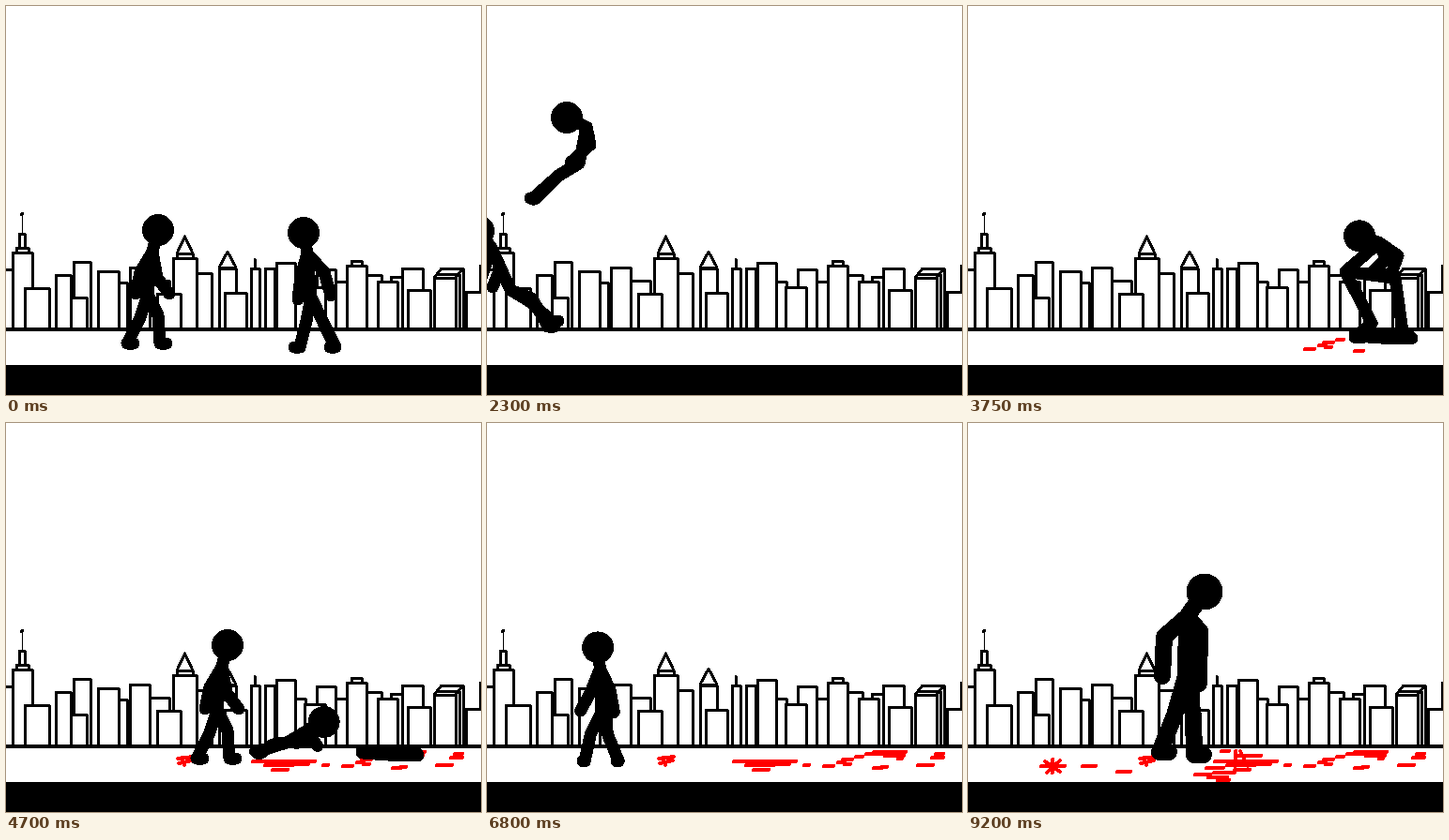
An HTML page that plays this animation: 506x415 px, repeating every 9.35 s.

```html
<!DOCTYPE html>
<html lang="en">
<head>
<meta charset="utf-8">
<title>City stick fight</title>
<style>
html, body { margin: 0; width: 100%; height: 100%; overflow: hidden; background: #fff; }
svg { display: block; width: 506px; height: 415px; shape-rendering: crispEdges; }
path { stroke-linecap: round; stroke-linejoin: round; }
</style>
</head>
<body>
<svg id="stage" viewBox="0 0 506 415">
  <g id="city" fill="#fff" stroke="#000" stroke-width="3"></g>
  <path d="M0 344.5H506" stroke="#000" stroke-width="4"/>
  <path d="M0 383H506V415H0Z"/>
  <g id="blood" fill="none" stroke="#f00" stroke-width="4"></g>
  <path id="corpse" d="M380 351L407 353L438 354" fill="none" stroke="#000" stroke-width="15"/>
  <g id="cast" stroke="#000" fill="none"></g>
  <g id="car">
    <path d="M-100 300L-70 288L0 283L78 275L95 290L160 291L222 286L229 256L262 268L305 265L365 275L371 292L383 297V309L372 318L350 325L338 345H288L282 331Q240 342 188 337L184 342L92 346L30 353H-90Z"/>
    <path d="M82 277L118 245L205 238L276 266M156 243L160 286" fill="none" stroke="#000" stroke-width="9"/>
    <path d="M155 243L160 286" stroke="#000" stroke-width="13"/>
    <circle cx="186" cy="269" r="17"/>
    <circle cx="61" cy="351" r="31"/>
    <circle cx="318" cy="334" r="31"/>
  </g>
</svg>
<script>
const LOOP = 9350, STEP_MS = 50;
const $ = id => document.getElementById(id);
function add(parent, tag, attrs) {
  const el = document.createElementNS('http://www.w3.org/2000/svg', tag);
  for (const k in attrs) el.setAttribute(k, attrs[k]);
  return parent.appendChild(el);
}

// Skyline: left, top, right; later buildings stand in front.
const buildings = `-9 281 8,14 243 20,11 258 24,7 263 28,20 301 46,53 287 69,72 273 90,69 311 86,
120 295 129,98 283 120,153 293 174,132 279 153,182 264 199,178 269 203,161 307 186,203 285 219,
227 280 245,233 306 256,261 280 270,276 280 286,288 274 308,308 294 319,331 281 351,318 300 340,
351 294 368,368 272 379,363 277 384,384 287 400,410 289 428,396 294 417,422 280 444,428 303 452`;
for (const item of buildings.split(',')) {
  const [l, t, r] = item.trim().split(' ').map(Number);
  add($('city'), 'path', { d: `M${l} 343V${t}H${r}V343` });
}
add($('city'), 'path', { d: 'M182 264L190.500 246L199 264ZM227 279L236 262L245 279ZM265 280V270' });
add($('city'), 'path', { d: 'M456 343V290L464 280H487V343M456 290H479V343M479 290L487 280M460 286H482M479 290V343M483 286V343' });
add($('city'), 'path', { d: 'M505 305V277H512M490 343V305H512V343' });
add($('city'), 'path', { d: 'M17 243V222', 'stroke-width': 1 });
add($('city'), 'circle', { cx: 17, cy: 222, r: 1, 'stroke-width': 2 });

const stains = [
  [3000, 'M359 366h10M374 362h7M379 359h10M381 364h6M393 356h7M412 368h9'],
  [4100, 'M404 353h20M412 351h34M424 355h20M438 358h4M420 367h6M459 365h16M474 357h12M478 353h8'],
  [4600, 'M263 361h66M276 365h30M284 370h16M310 364h12M338 365h5M183 358l16-2M184 363l14-3M187 357l3 8'],
  [8250, 'M242 375h16M256 378h20M266 381h12M254 368h18M262 373h22M270 350h8M285 350v16M290 350l8 16M288 355h24'],
  [8950, 'M78 366h25M82 361l16 11M98 360l-14 13M90 359v14M122 366h14M159 372h14']
].map(([from, d]) => ({ from, el: add($('blood'), 'path', { d }) }));

// Joints: head, neck, hip, elbow+hand twice, knee+foot twice; stored relative to the hip.
function pose(text, toe = 7) {
  const n = text.split(/[ ,]+/).map(Number);
  return [...n.map((v, i) => v - n[4 + i % 2]), toe];
}
const flip = p => p.map((v, i) => i % 2 ? v : -v);
const WALK = pose('162,239 156,262 151,308 143,284 138,307 161,290 174,307 142,335 129,360 162,330 164,360');
const STRIDE = pose('46,229 40,250 32,296 20,268 13,292 36,276 51,295 43,320 27,347 24,325 17,354');
const GUARD = pose('317,242 321,264 325,310 314,288 311,313 339,284 346,309 320,336 313,364 338,338 351,364', -6);
const BENT = pose('487,268 467,265 441,298 460,288 463,309 474,292 483,308 431,324 410,348 448,324 458,348');
const THROWN = pose('-9,240 5,258 25,303 -2,278 -8,296 14,280 6,300 48,312 65,342 45,315 69,336');
const TUCK = pose('85,117 106,127 98,166 110,146 89,165 109,140 95,165 75,180 51,204 77,178 49,203', -3);
const CROUCH = pose('417,245 438,252 402,283 458,266 450,288 445,270 430,284 430,338 412,353 455,290 464,354', 9);
const VAULT = pose('248,155 268,162 272,205 300,168 316,183 296,178 303,198 259,235 290,240 268,232 298,260', 2);
const HELD = pose('212,208 222,228 208,284 222,242 183,256 224,250 222,265 199,293 172,304 197,294 174,303', -2);
const LYING = pose('341,350 325,352 300,351 315,358 298,356 325,345 338,358 288,350 277,349 290,351 276,349', -2);
const PUNCH = pose('15,-68 8,-45 0,0 -10,-30 5,-24 30,-46 53,-48 -12,25 -28,52 18,25 20,52');
const KICK = pose('-18,-66 -8,-45 0,0 -28,-30 -20,-12 8,-28 22,-38 -4,26 -6,52 24,-6 52,-16');
const BIG_RUN = pose('160,182 148,207 153,283 109,232 110,268 190,228 217,222 130,315 92,351 160,320 157,358', 9);
const BIG_STAND = pose('252,180 233,207 232,270 209,228 207,270 247,222 246,278 220,312 204,351 240,312 241,354', 10);
const LEFT_WALK = flip(WALK), LEFT_STRIDE = flip(STRIDE);

// Alternates two poses at a steady pace.
function walk(t0, x0, t1, x1, a = WALK, b = STRIDE, y = 304) {
  const count = Math.max(1, Math.round((t1 - t0) / 150));
  return Array.from({ length: count + 1 }, (_, i) =>
    [t0 + (t1 - t0) * i / count, i % 2 ? b : a, x0 + (x1 - x0) * i / count, y]);
}

// Keys: time, pose, hip x, hip y, turn in degrees.
const cast = [
  { keys: [
    [0, WALK, 151, 308], [200, STRIDE, 185, 300], [350, WALK, 230, 305], [450, PUNCH, 262, 305],
    [550, WALK, 280, 306], [650, KICK, 300, 303], [800, WALK, 325, 306], [950, STRIDE, 368, 300],
    [1100, WALK, 410, 300], [1250, BENT, 441, 298], [1400, BENT, 440, 300],
    ...walk(1500, 425, 1950, 165, LEFT_WALK, LEFT_STRIDE),
    [2050, flip(KICK), 112, 258], [2150, flip(KICK), 90, 230], [2300, TUCK, 98, 168],
    [2450, TUCK, 190, 122, 150], [2600, TUCK, 285, 130, 290], [2750, WALK, 375, 220, 360],
    [2850, KICK, 408, 290, 360], [2950, PUNCH, 410, 304, 360], [3100, WALK, 408, 306, 360],
    [3250, KICK, 410, 303, 360], [3450, WALK, 408, 304, 360], [3650, CROUCH, 402, 284, 360],
    [3800, CROUCH, 402, 283, 360], [3950, GUARD, 400, 308, 360], [4050, flip(PUNCH), 375, 265, 360],
    [4200, TUCK, 310, 195, 260], [4350, TUCK, 235, 225, 80], [4450, WALK, 195, 300, 0],
    [4550, KICK, 225, 300], [4700, WALK, 225, 306], ...walk(4850, 225, 5150, 270),
    [5300, GUARD, 278, 308], [5550, GUARD, 278, 308], [5700, VAULT, 275, 252], [5850, VAULT, 272, 205],
    [6000, TUCK, 235, 135, -60], [6150, TUCK, 200, 108, -180], [6350, TUCK, 155, 175, -320],
    [6500, WALK, 125, 295, -360], [6650, LEFT_WALK, 122, 308, -360], [7050, flip(GUARD), 122, 308, -360],
    [7200, flip(PUNCH), 125, 306, -360], [7350, LEFT_WALK, 122, 305, -360], [7600, HELD, 130, 280, -360],
    [7800, HELD, 175, 285, -360], [7950, HELD, 208, 284, -360], [8100, HELD, 230, 275, -360],
    [8250, THROWN, 255, 335, -290], [8450, THROWN, 250, 335, -290], [8600, HELD, 235, 270, -360],
    [8750, TUCK, 200, 145, -420], [8850, TUCK, 140, 170, -520], [8950, THROWN, 85, 322, -450],
    [9050, THROWN, 35, 325, -450], [9200, THROWN, -90, 320, -450]
  ] },
  { keys: [
    [0, GUARD, 325, 310], [250, GUARD, 322, 310], [400, flip(PUNCH), 324, 310], [500, flip(THROWN), 345, 300],
    [650, flip(THROWN), 365, 298], [800, flip(THROWN), 450, 255, 30], [950, flip(THROWN), 560, 280, 70]
  ] },
  { keys: [
    [1000, WALK, -45, 304], [1100, STRIDE, -14, 300], [1250, STRIDE, 32, 296], ...walk(1400, 45, 1850, 72),
    [2000, PUNCH, 72, 305], [2100, THROWN, 62, 292], [2300, THROWN, 25, 303], [2550, THROWN, -95, 315]
  ] },
  { keys: [
    ...walk(2550, 535, 2850, 462, LEFT_WALK, LEFT_STRIDE), [2950, flip(THROWN), 464, 305],
    [3100, GUARD, 462, 308], [3250, flip(THROWN), 464, 310], [3400, flip(LYING), 442, 352]
  ] },
  { drag: true, keys: [
    ...walk(3850, 540, 4350, 295, LEFT_WALK, LEFT_STRIDE), [4500, flip(PUNCH), 280, 306],
    [4600, flip(THROWN), 300, 320], [4750, LYING, 300, 351], [6700, LYING, 300, 351]
  ] },
  { head: 19.5, limb: 18, keys: [
    [6700, BIG_RUN, -70, 283], ...walk(6800, -45, 7150, 45, BIG_STAND, BIG_RUN, 280),
    [7300, BIG_RUN, 58, 283], [7450, BIG_STAND, 58, 276], [7600, BIG_RUN, 72, 283],
    [7750, BIG_STAND, 110, 278], [7950, BIG_RUN, 153, 283], [8100, BIG_RUN, 178, 283],
    [8250, BIG_STAND, 205, 280, 12], [8450, BIG_STAND, 208, 278, 10], [8600, BIG_RUN, 205, 282],
    [8750, flip(BIG_RUN), 208, 280], [8900, flip(BIG_RUN), 212, 280], [9050, BIG_STAND, 226, 272],
    [9200, BIG_STAND, 232, 270], [9400, BIG_STAND, 232, 270]
  ] }
];
for (const actor of cast) {
  actor.el = add($('cast'), 'g', {});
  actor.body = add(actor.el, 'path', { 'stroke-width': actor.limb || 13 });
  actor.skull = add(actor.el, 'circle', { r: actor.head || 17, fill: '#000', stroke: 'none' });
}

const mix = (a, b, k) => a + (b - a) * k;
function sample(keys, t) {
  const i = keys.findIndex((k, n) => n + 1 < keys.length && t >= k[0] && t < keys[n + 1][0]);
  if (i < 0) return null;
  const [t0, p, x0, y0, r0 = 0] = keys[i], [t1, q, x1, y1, r1 = 0] = keys[i + 1];
  const k = (t - t0) / (t1 - t0);
  return { joints: p.map((v, n) => mix(v, q[n], k)), x: mix(x0, x1, k), y: mix(y0, y1, k), turn: mix(r0, r1, k) };
}
function drawActor(actor, t, shift) {
  const s = sample(actor.keys, t);
  actor.el.style.display = s ? '' : 'none';
  if (!s) return;
  const j = s.joints, at = i => `${j[i * 2].toFixed(1)} ${j[i * 2 + 1].toFixed(1)}`;
  const line = (...ids) => 'M' + ids.map(at).join('L');
  const foot = (knee, ankle) => line(2, knee, ankle) + `h${j[22].toFixed(1)}`;
  actor.body.setAttribute('d', line(0, 1, 2) + line(1, 3, 4) + line(1, 5, 6) + foot(7, 8) + foot(9, 10));
  actor.skull.setAttribute('cx', j[0]);
  actor.skull.setAttribute('cy', j[1]);
  actor.el.setAttribute('transform', `translate(${s.x + (actor.drag ? shift : 0)} ${s.y}) rotate(${s.turn})`);
}

function draw(t) {
  const since = t - 5850;
  const carX = 0.36 * since + (since > 0 ? 0.0005 * since * since : 0);
  const shift = Math.max(0, carX);
  $('car').style.display = t >= 4750 && t < 6700 ? '' : 'none';
  $('car').setAttribute('transform', `translate(${carX} 0)`);
  const slide = 33 * (1 - Math.min(1, Math.max(0, (t - 3850) / 300)));
  $('corpse').style.display = t >= 3400 && t < 6700 ? '' : 'none';
  $('corpse').setAttribute('transform', `translate(${slide + shift} 0)`);
  for (const s of stains) s.el.style.display = t >= s.from ? '' : 'none';
  for (const actor of cast) drawActor(actor, t, shift);
}

let start;
function tick(now) {
  start ??= now;
  const t = (now - start) % LOOP;
  draw(Math.min(9200, Math.floor(t / STEP_MS) * STEP_MS));
  requestAnimationFrame(tick);
}
draw(0);
requestAnimationFrame(tick);
</script>
</body>
</html>
```
